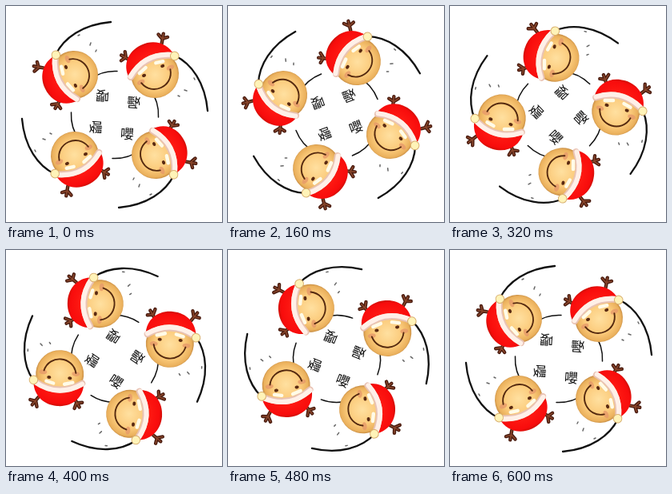
Recreate the animation shown at these times as an HTML page. Size 270 by 270 pixels, loop 640 ms.

```html
<!DOCTYPE html>
<html lang="zh">
<head>
<meta charset="utf-8">
<style>
  html, body { margin: 0; width: 100%; height: 100%; overflow: hidden; background: #fff; }
  svg { display: block; width: 100%; height: 100%; }
  text { font: 500 17px "Noto Sans CJK TC", "Noto Sans CJK SC", "Noto Sans CJK JP", "Noto Sans CJK", sans-serif; }
</style>
</head>
<body>
<svg viewBox="0 0 270 270">
  <defs>
    <radialGradient id="skin" cx=".5" cy=".52" r=".52">
      <stop offset="0" stop-color="#ffe0a0"/>
      <stop offset=".6" stop-color="#fbca7a"/>
      <stop offset=".88" stop-color="#eab05c"/>
      <stop offset="1" stop-color="#b67b36"/>
    </radialGradient>
    <radialGradient id="felt" cx=".5" cy=".6" r=".6">
      <stop offset="0" stop-color="#ff1c14"/>
      <stop offset=".8" stop-color="#f80c0c"/>
      <stop offset="1" stop-color="#d01008"/>
    </radialGradient>
    <g id="antler" fill="none" stroke-linecap="round">
      <path id="branch" d="M4 6 L-3 -4 M0 1 L-6 2 M1 1 L3 -6" stroke="#4a1c10" stroke-width="4.4"/>
      <path d="M4 6 L-3 -4 M0 1 L-6 2 M1 1 L3 -6" stroke="#88452a" stroke-width="1.6"/>
    </g>
    <g id="head">
      <use href="#antler" x="-25" y="-35"/>
      <use href="#antler" transform="translate(28 -37) scale(-1 1)"/>
      <circle r="30" fill="url(#skin)"/>
      <path d="M-31 -9 C-32 -28 -18 -40 0 -40 C18 -40 31 -28 32 -11 Q2 -30 -31 -9Z" fill="url(#felt)"/>
      <path d="M-29 -9 Q0 -29 31 -11" fill="none" stroke="#e9c3b4" stroke-width="8" stroke-linecap="round"/>
      <path d="M-29 -10 Q0 -30 31 -12" fill="none" stroke="#fff0e8" stroke-width="6" stroke-linecap="round"/>
      <circle cx="32" cy="-10" r="5.3" fill="#fff3b8" stroke="#d9b070"/>
      <g fill="#e79a6a" opacity=".8">
        <ellipse cx="-20" cy="2" rx="5" ry="3"/>
        <ellipse cx="21" cy="1" rx="5" ry="3"/>
      </g>
      <path d="M-17 -9 L-7 -12 M7 -12 L16 -10" stroke="#fffbe8" stroke-width="4.4" stroke-linecap="round"/>
      <g fill="#5a2a12">
        <ellipse cx="-13" cy="-4" rx="2.6" ry="2"/>
        <ellipse cx="13" cy="-5" rx="2.6" ry="2"/>
      </g>
      <path d="M-20 3 C-15 24 15 24 20 3" fill="none" stroke="#54290f" stroke-width="1.9" stroke-linecap="round"/>
    </g>
    <g id="figure" stroke-linecap="round">
      <path d="M44 -32 A54 54 0 0 1 54.5 3" fill="none" stroke="#111" stroke-width="1.5"/>
      <path d="M75 -74 C96 -64 113 -40 116 -5" fill="none" stroke="#111" stroke-width="2.3"/>
      <path d="M99 -46 l1 2 M87 -31 l3 1 M79 -24 l2 1" stroke="#666" stroke-width="1.5"/>
      <use href="#head" transform="translate(50 -51) rotate(-25)"/>
      <text transform="translate(24 -15.5) rotate(-86)" text-anchor="middle" y="6" fill="#111">嚶</text>
    </g>
  </defs>
  <g id="ring">
    <use href="#figure"/>
    <use href="#figure" transform="rotate(90)"/>
    <use href="#figure" transform="rotate(180)"/>
    <use href="#figure" transform="rotate(270)"/>
  </g>
</svg>
<script>
  const STEP_MS = 40, STEPS = 16, STEP_DEG = 6;
  const ring = document.getElementById("ring");
  const start = performance.now();

  // Fifteen turns of six degrees make a quarter turn, where the ring looks the same again.
  function draw(ms) {
    const step = Math.floor(Math.max(0, ms) / STEP_MS) % STEPS;
    ring.setAttribute("transform", `translate(136 136) rotate(${-STEP_DEG * step})`);
  }

  function tick() {
    draw(performance.now() - start);
    requestAnimationFrame(tick);
  }

  draw(0);
  requestAnimationFrame(tick);
</script>
</body>
</html>
```
